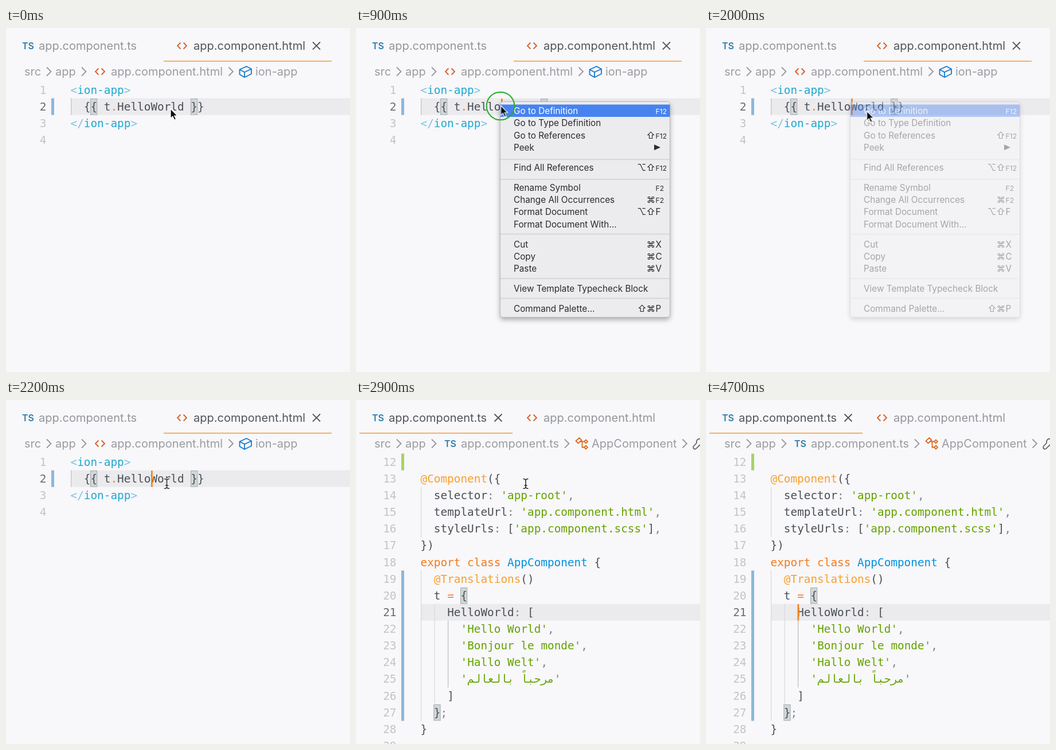
Write an HTML page that moves like this. It is 600 by 600 pixels and loops after 4800 ms.

```html
<!DOCTYPE html>
<html lang="en">
<head>
<meta charset="utf-8">
<title>Go to definition</title>
<style>
  html, body { margin: 0; width: 100%; height: 100%; overflow: hidden; background: #f8f7fa; }
  svg { display: block; width: 600px; height: 600px; }
  text { white-space: pre; }
  .ui { font: 20px Inter, "Open Sans", sans-serif; }
  .ts { font: 600 16px Inter, "Open Sans", sans-serif; fill: #2c7fab; }
  .item { font: 15.3px Inter, "Open Sans", sans-serif; fill: #2b2a2d; }
  .small { font-size: 12.2px; }
  .end { text-anchor: end; }
  .code { font: 19.38px "DejaVu Sans Mono", monospace; fill: #4a5056; }
  .num { fill: #c3c4c8; text-anchor: end; }
  .num.on { fill: #686c72; }
  .tag { fill: #22a8cf; }
  .edge { fill: #79c4de; }
  .dim { fill: #7f8488; }
  .op { fill: #f27d3a; }
  .key { fill: #f57a1c; }
  .fn { fill: #f8a02e; }
  .str { fill: #64a300; }
  .cls { fill: #0092e0; }
  .line { fill: none; stroke-width: 1.8; }

  /* One loop, hard cuts unless a keyframe says otherwise */
  .play { animation: 4.8s step-end infinite; }
  #html { animation-name: page1; }
  #tsx { animation-name: page2; }
  #caret1 { animation-name: caret1; }
  #caret2 { animation-name: caret2; }
  #menu { animation-name: menu; }
  #pick { animation-name: pick; }
  #pickText { animation-name: pickText; }
  #arrow { animation-name: arrow; }
  #beam { animation-name: beam; }
  #ring1 { animation-name: ring1; }
  #ring2 { animation-name: ring2; }
  @keyframes page1 { 0% { opacity: 1 } 49.9%, 100% { opacity: 0 } }
  @keyframes page2 { 0% { opacity: 0 } 49.9%, 100% { opacity: 1 } }
  @keyframes caret1 { 0% { opacity: 0 } 12.4%, 100% { opacity: 1 } }
  @keyframes caret2 {
    0%, 49.9% { opacity: 1 } 60.3% { opacity: 0 } 70.7% { opacity: 1 }
    81.1% { opacity: 0 } 91.5%, 100% { opacity: 1 }
  }
  @keyframes menu { 0% { opacity: 0 } 14.5% { opacity: 1 } 41.6% { opacity: .4 } 43.7%, 100% { opacity: 0 } }
  @keyframes pick { 0% { opacity: 1 } 37.4% { opacity: 0 } 39.5%, 100% { opacity: 1 } }
  @keyframes pickText { 0% { fill: #fff } 37.4% { fill: #2b2a2d } 39.5%, 100% { fill: #fff } }
  @keyframes arrow {
    0% { transform: translate(287px, 141px); opacity: 1; animation-timing-function: steps(5) }
    10.4% { transform: translate(252.5px, 135.5px); opacity: 1 }
    27% { transform: translate(252.5px, 135.5px); opacity: 1; animation-timing-function: steps(3) }
    33.2% { transform: translate(280.5px, 145px); opacity: 1 }
    43.7%, 100% { transform: translate(280.5px, 145px); opacity: 0 }
  }
  @keyframes beam {
    0% { transform: translate(280.5px, 146px); opacity: 0 }
    43.7% { transform: translate(280.5px, 146px); opacity: 1 }
    49.9% { transform: translate(280.5px, 146px); opacity: 1; animation-timing-function: steps(3) }
    56.2% { transform: translate(296px, 146px); opacity: 1 }
    77%, 100% { transform: translate(296px, 146px); opacity: 0 }
  }
  @keyframes ring1 { 0% { opacity: 0 } 12.4% { opacity: 1 } 27%, 100% { opacity: 0 } }
  @keyframes ring2 { 0% { opacity: 0 } 33.2% { opacity: 1 } 39.5%, 100% { opacity: 0 } }
</style>
</head>
<body>
<svg viewBox="0 0 600 600">
  <defs>
    <filter id="shadow" x="-10%" y="-10%" width="120%" height="120%">
      <feDropShadow dx="0" dy="4" stdDeviation="4.5" flood-color="#000" flood-opacity=".3"/>
    </filter>
    <path id="chev" class="line" stroke="#94989c" d="M-3.5-7.5 4 0-3.5 7.5"/>
    <path id="angle" class="line" stroke="#d2602a" d="M-2.6-5.5-8 0-2.6 5.5M2.6-5.5 8 0 2.6 5.5"/>
    <path id="close" class="line" stroke="#50555a" d="M-6.5-6.5 6.5 6.5M6.5-6.5-6.5 6.5"/>
  </defs>
  <rect width="600" height="600" fill="#f8f7fa"/>
  <g id="html" class="play"></g>
  <g id="tsx" class="play"></g>
  <g id="menu" class="play"></g>
  <circle id="ring1" class="play" cx="252" cy="136" r="24.3" fill="none" stroke="#23ae2b" stroke-width="2"/>
  <circle id="ring2" class="play" cx="280" cy="145.5" r="24.3" fill="none" stroke="#151515" stroke-width="2"/>
  <g id="arrow" class="play">
    <path d="M0 0V16.6L3.8 13.1 6.6 19.4 9.5 18.1 6.7 12H12Z" fill="#0b0b0b" stroke="#fff" stroke-width="1.2"/>
  </g>
  <g id="beam" class="play">
    <path id="beamLine" d="M-4.5-8.5Q0-8.5 0-5.5Q0-8.5 4.5-8.5M0-6V6M-4.5 8.5Q0 8.5 0 5.5Q0 8.5 4.5 8.5M-2.5 3H2.5"
      fill="none" stroke="#fff" stroke-width="3.4"/>
    <use href="#beamLine" style="display:none"/>
    <path d="M-4.5-8.5Q0-8.5 0-5.5Q0-8.5 4.5-8.5M0-6V6M-4.5 8.5Q0 8.5 0 5.5Q0 8.5 4.5 8.5M-2.5 3H2.5"
      fill="none" stroke="#222" stroke-width="1.5"/>
  </g>
</svg>
<script>
const STEP = 29.13, CELL = 11.67, LEFT = 112.5;
const page1 = document.getElementById('html');
const page2 = document.getElementById('tsx');
const menu = document.getElementById('menu');

function add(parent, name, attrs, text) {
  const el = document.createElementNS('http://www.w3.org/2000/svg', name);
  for (const key in attrs) el.setAttribute(key, attrs[key]);
  if (text) el.textContent = text;
  return parent.appendChild(el);
}
const rect = (g, x, y, width, height, fill, more) => add(g, 'rect', { x, y, width, height, fill, ...more });
const label = (g, x, y, text, fill, cls = 'ui') =>
  add(g, 'text', { x, y, class: cls, ...(fill && { fill }) }, text);
const stamp = (g, id, x, y) => add(g, 'use', { href: '#' + id, x, y });
const line = (g, d, stroke) => add(g, 'path', { class: 'line', d, stroke });

const ACTIVE = '#50555a', IDLE = '#92969b', CRUMB = '#999da1';

function header(g, script) {
  label(g, 28, 36.5, 'TS', '', 'ts');
  label(g, 57, 38, 'app.component.ts', script ? ACTIVE : IDLE);
  stamp(g, 'angle', 307, 31);
  label(g, 327, 38, 'app.component.html', script ? IDLE : ACTIVE);
  stamp(g, 'close', script ? 248 : 541.5, 31);
  rect(g, script ? 6 : 275, 57, script ? 267 : 293, 1.6, '#f3a146');
  label(g, 32, 83, 'src', CRUMB);
  label(g, 86, 83, 'app', CRUMB);
  const chevs = script ? [74.5, 135.5, 367.5, 573] : [74.5, 135.5, 392];
  chevs.forEach(x => stamp(g, 'chev', x, 76));
}

const mid = k => 108 + STEP * k;

function number(g, k, n, on) {
  label(g, 70.5, mid(k) + 6.8, n, '', 'code num' + (on ? ' on' : ''));
}

// parts: alternating class and text
function code(g, k, indent, ...parts) {
  const row = add(g, 'text', { x: LEFT + indent * CELL, y: mid(k) + 6.8, class: 'code' });
  for (let i = 0; i < parts.length; i += 2) add(row, 'tspan', { class: parts[i] }, parts[i + 1]);
}

const band = (g, k) => rect(g, 113, mid(k) - 14.5, 487, STEP, '#ebeaed');
const guide = (g, x, from, to, fill = '#d9d9dd') =>
  rect(g, x, mid(from) - 14.5, 1.2, STEP * (to - from + 1), fill);
const gutter = (g, from, to, fill) => rect(g, 79, mid(from) - 14.5, 5, STEP * (to - from + 1), fill);
const bracket = (g, k, col) =>
  rect(g, LEFT + col * CELL, mid(k) - 13.6, CELL - .4, 27.6, '#d1d6d7', { stroke: '#a7adb0' });
const caret = (g, id, x, k) => rect(g, x, mid(k) - 14, 2.8, 28.5, '#f6861c', { id, class: 'play' });

// Template page
header(page1, false);
stamp(page1, 'angle', 164, 76);
label(page1, 183, 83, 'app.component.html', CRUMB);
line(page1, 'M407.5 72.5 419.5 67 428 71.5V80L416 86 407.5 81ZM407.5 72.5 416 77 428 71.5M416 77V86', '#1479cb');
label(page1, 435, 83, 'ion-app', CRUMB);
band(page1, 1);
guide(page1, 113, 1, 1, '#c2c2c7');
gutter(page1, 1, 1, '#8ab8d9');
bracket(page1, 1, 3);
bracket(page1, 1, 18);
for (let k = 0; k < 4; k++) number(page1, k, k + 1, k === 1);
code(page1, 0, 0, 'edge', '<', 'tag', 'ion-app', 'edge', '>');
code(page1, 1, 2, '', '{{ t', 'op', '.', '', 'HelloWorld }}');
code(page1, 2, 0, 'edge', '</', 'tag', 'ion-app', 'edge', '>');
caret(page1, 'caret1', 253, 1);

// Script page
header(page2, true);
label(page2, 154, 81.5, 'TS', '', 'ts');
label(page2, 183, 83, 'app.component.ts', CRUMB);
line(page2, 'M383.5 71.5 389.5 66 393.5 70 387.5 75.5ZM391.5 72.5H398M394.5 72.5V82.5H398M398 72.5 401 69.5 404 72.5 401 75.5ZM398 82.5 401 79.5 404 82.5 401 85.5Z', '#dc6a20');
label(page2, 411, 83, 'AppComponent', CRUMB);
line(page2, 'M600 67.5Q593 68 594 75L588.5 81Q587.5 84 590 85.5 592 86.5 594 84L600 78', '#666a6e');
band(page2, 9);
guide(page2, 113, 2, 4);
guide(page2, 113, 7, 15);
guide(page2, 136.5, 9, 14);
guide(page2, 160, 10, 13, '#bcbcc1');
gutter(page2, 0, 0, '#a6d16c');
gutter(page2, 7, 15, '#8ab8d9');
bracket(page2, 8, 6);
bracket(page2, 15, 2);
for (let k = 0; k < 18; k++) number(page2, k, k + 12, k === 9);
code(page2, 1, 0, 'fn', '@Component', '', '({');
code(page2, 2, 2, '', 'selector', 'dim', ': ', 'str', "'app-root'", 'dim', ',');
code(page2, 3, 2, '', 'templateUrl', 'dim', ': ', 'str', "'app.component.html'", 'dim', ',');
code(page2, 4, 2, '', 'styleUrls', 'dim', ': ', '', '[', 'str', "'app.component.scss'", '', ']', 'dim', ',');
code(page2, 5, 0, '', '})');
code(page2, 6, 0, 'key', 'export class ', 'cls', 'AppComponent', '', ' {');
code(page2, 7, 2, 'fn', '@Translations', '', '()');
code(page2, 8, 2, '', 't ', 'op', '=', '', ' {');
code(page2, 9, 4, '', 'HelloWorld', 'dim', ': ', '', '[');
['Hello World', 'Bonjour le monde', 'Hallo Welt'].forEach((s, i) =>
  code(page2, 10 + i, 6, 'str', `'${s}'`, 'dim', ','));
code(page2, 13, 6, 'str', "'مرحباً بالعالم'");
code(page2, 14, 4, '', ']');
code(page2, 15, 2, '', '}', 'dim', ';');
code(page2, 16, 0, '', '}');
caret(page2, 'caret2', 159.5, 9);

// Context menu
rect(menu, 251.5, 128.5, 296, 376, '#ecebee', { rx: 5, stroke: '#b8b7bb', filter: 'url(#shadow)' });
rect(menu, 251.5, 133.5, 296, 21.5, '#4783ef', { id: 'pick', class: 'play' });
[229.2, 264, 359.5, 437, 471.5].forEach(y => rect(menu, 252, y - 1, 295, 2, '#d7d6d9'));
const ITEMS = [
  [144, 'Go to Definition', '', 'F12'],
  [165.5, 'Go to Type Definition'],
  [187, 'Go to References', '⇧', 'F12'],
  [208, 'Peek'],
  [243, 'Find All References', '⌥⇧', 'F12'],
  [278, 'Rename Symbol', '', 'F2'],
  [299, 'Change All Occurrences', '⌘', 'F2'],
  [320.5, 'Format Document', '⌥⇧', 'F'],
  [342, 'Format Document With…'],
  [377, 'Cut', '⌘', 'X'],
  [398, 'Copy', '⌘', 'C'],
  [419.5, 'Paste', '⌘', 'V'],
  [454, 'View Template Typecheck Block'],
  [489, 'Command Palette…', '⇧⌘', 'P']
];
ITEMS.forEach(([y, name, mods, key], i) => {
  const g = add(menu, 'g', i ? {} : { id: 'pickText', class: 'play' });
  const cls = 'item' + (key && key.length > 1 ? ' small' : '');
  const texts = [label(g, 275, y + 5.5, name, '', 'item')];
  if (mods) label(g, 522, y + 5.5, mods, '', 'item end');
  if (key) texts.push(label(g, 522.5, y + 5.5, key, '', cls));
  if (!i) texts.forEach(t => t.style.fill = 'inherit');
});
add(menu, 'path', { d: 'M520 203.3 531 208.3 520 213.3Z', fill: '#2b2a2d' });
</script>
</body>
</html>
```
